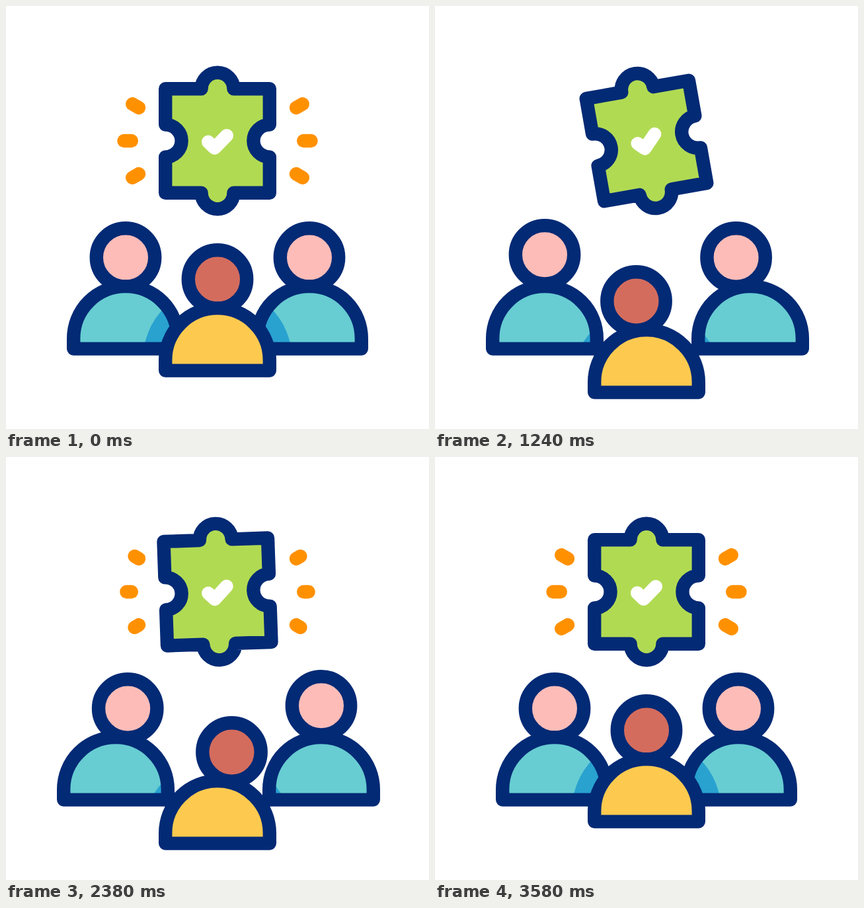
These frames come from a looping animation (640 px wide and 640 px high, 3.6 s). An HTML page:

```html
<!DOCTYPE html>
<html lang="en">
<head>
<meta charset="utf-8">
<title>Team puzzle</title>
<style>
  html, body { margin: 0; width: 100%; height: 100%; overflow: hidden; background: #fff; }
  svg { display: block; width: 640px; height: 640px; }
  .line { stroke: #032a75; stroke-width: 20.4; stroke-linejoin: round; }
  .line, .tick { vector-effect: non-scaling-stroke; }
  .tick { fill: none; stroke: #fff; stroke-width: 20; stroke-linecap: round; stroke-linejoin: round; }
  #rays { stroke: #ff9100; stroke-width: 20.4; stroke-linecap: round; }
</style>
</head>
<body>
<svg viewBox="0 0 640 640">
  <defs>
    <path id="torso"/>
    <clipPath id="inTorso"><use href="#torso"/></clipPath>
  </defs>
  <g id="rays"></g>
  <g id="puzzle"></g>
  <g id="people"></g>
</svg>
<script>
const LOOP = 3600;
const MID = 320;          // centre line of the stage
const HALF = 78.8;        // half width of the puzzle and of every torso
const KNOB = 24.4;
const HEAD_Y = 380.5, SHOULDER_Y = 502.9, BASE_Y = 518.6, PUZZLE_Y = 204;

const $ = id => document.getElementById(id);

function make(tag, parent, attrs = {}) {
  const el = document.createElementNS('http://www.w3.org/2000/svg', tag);
  set(el, attrs);
  return parent.appendChild(el);
}

function set(el, attrs) {
  for (const k in attrs) el.setAttribute(k, attrs[k]);
}

// Smooth 0 to 1 between two times, and a rise followed by a fall.
function ramp(t, from, to) {
  const u = Math.min(1, Math.max(0, (t - from) / (to - from)));
  return u * u * (3 - 2 * u);
}
const pulse = (t, a, b, c, d) => ramp(t, a, b) - ramp(t, c, d);

// Three nods of a speaking head.
function nod(t, start) {
  const u = (t - start) / 312;
  return u > 0 && u < 3 ? -4.2 * Math.sin(Math.PI * u) ** 2 : 0;
}

// Knobs stick out at top and bottom and cut in at the sides.
function puzzlePath(h, k) {
  const arc = (sweep, x, y) => `A${k} ${k} 0 0 ${sweep} ${x} ${y}`;
  return `M${-h} ${-h}H${-k}${arc(1, k, -h)}H${h}V${-k}${arc(0, h, k)}` +
    `V${h}H${k}${arc(1, -k, h)}H${-h}V${k}${arc(0, -h, -k)}Z`;
}

function person(skin, shirt, shaded) {
  const head = make('circle', $('people'), { r: 44.2, class: 'line', fill: skin });
  const body = make('g', $('people'));
  make('use', body, { href: '#torso', fill: shirt });
  const shade = shaded &&
    make('circle', make('g', body, { 'clip-path': 'url(#inTorso)' }), { r: 113, fill: '#29a2d0' });
  make('use', body, { href: '#torso', class: 'line', fill: 'none' });

  return (headX, headY, bodyX, drop, shadeY) => {
    set(head, { cx: headX, cy: headY });
    set(body, { transform: `translate(${bodyX} ${drop})` });
    if (shade) set(shade, { cx: MID - bodyX, cy: shadeY });
  };
}

set($('torso'), {
  d: `M${-HALF} ${BASE_Y}V${SHOULDER_Y}A${HALF} ${HALF} 0 0 1 ${HALF} ${SHOULDER_Y}V${BASE_Y}Z`
});
make('path', $('puzzle'), { class: 'line', fill: '#b1da53', d: puzzlePath(HALF, KNOB) });
make('path', $('puzzle'), { class: 'tick', d: 'M-14 1.6L-4.5 11L14-8' });

const left = person('#fdbcb8', '#67cdd2', true);
const right = person('#fdbcb8', '#67cdd2', true);
const mid = person('#d46c5d', '#fdca4f', false);

// Three rays fan out on each side, 30 degrees apart.
const rays = [-1, 1].flatMap(side => [-1, 0, 1].map(row => {
  const a = row * Math.PI / 6;
  const x = MID + side * (row ? 119 : 130.2), y = PUZZLE_Y + row * 50.1;
  const el = make('line', $('rays'), { x1: x, y1: y });
  return length => set(el, {
    x2: x + side * Math.cos(a) * length,
    y2: y + Math.sin(a) * length
  });
}));

function draw(t) {
  const spread = pulse(t, 0, 480, 3240, 3570);
  const swap = ramp(t, 1600, 2000);   // attention moves to the other speaker

  const drop = 33 + 33 * spread;
  const leftX = 181 - 15 * spread;
  const rightX = 459 + 18 * spread;
  const leftHead = leftX + 18.2 * swap * spread;
  const rightHead = rightX - 21.4 * (ramp(t, 400, 725) - swap);
  const midHead = MID - 15.5 * pulse(t, 0, 500, 1400, 1860) + 21.5 * pulse(t, 1400, 1860, 2560, 3000);
  const shadeY = SHOULDER_Y + drop;

  left(leftHead, HEAD_Y + nod(t, 460), leftX, 0, shadeY);
  right(rightHead, HEAD_Y + nod(t, 1912), rightX, 0, shadeY);
  mid(midHead, HEAD_Y + drop, MID, drop);

  const scale = 1 + .04 * pulse(t, 0, 180, 180, 400) - .082 * pulse(t, 180, 520, 540, 760);
  const y = PUZZLE_Y - 32 * pulse(t, 560, 780, 780, 1020) - 8.3 * pulse(t, 1340, 1600, 1900, 2160);
  const turn = -10 * pulse(t, 600, 960, 1300, 1600) - 2 * pulse(t, 1300, 1600, 2400, 2740);
  set($('puzzle'), { transform: `translate(${MID} ${y}) rotate(${turn}) scale(${scale})` });

  const glow = 1 - ramp(t, 0, 220) + pulse(t, 2290, 2440, 2540, 2690) + ramp(t, 3370, 3560);
  $('rays').style.display = glow > .001 ? '' : 'none';
  rays.forEach(ray => ray(11.3 * glow));
}

const start = performance.now();
function tick() {
  draw((performance.now() - start) % LOOP);
  requestAnimationFrame(tick);
}
tick();
</script>
</body>
</html>
```
